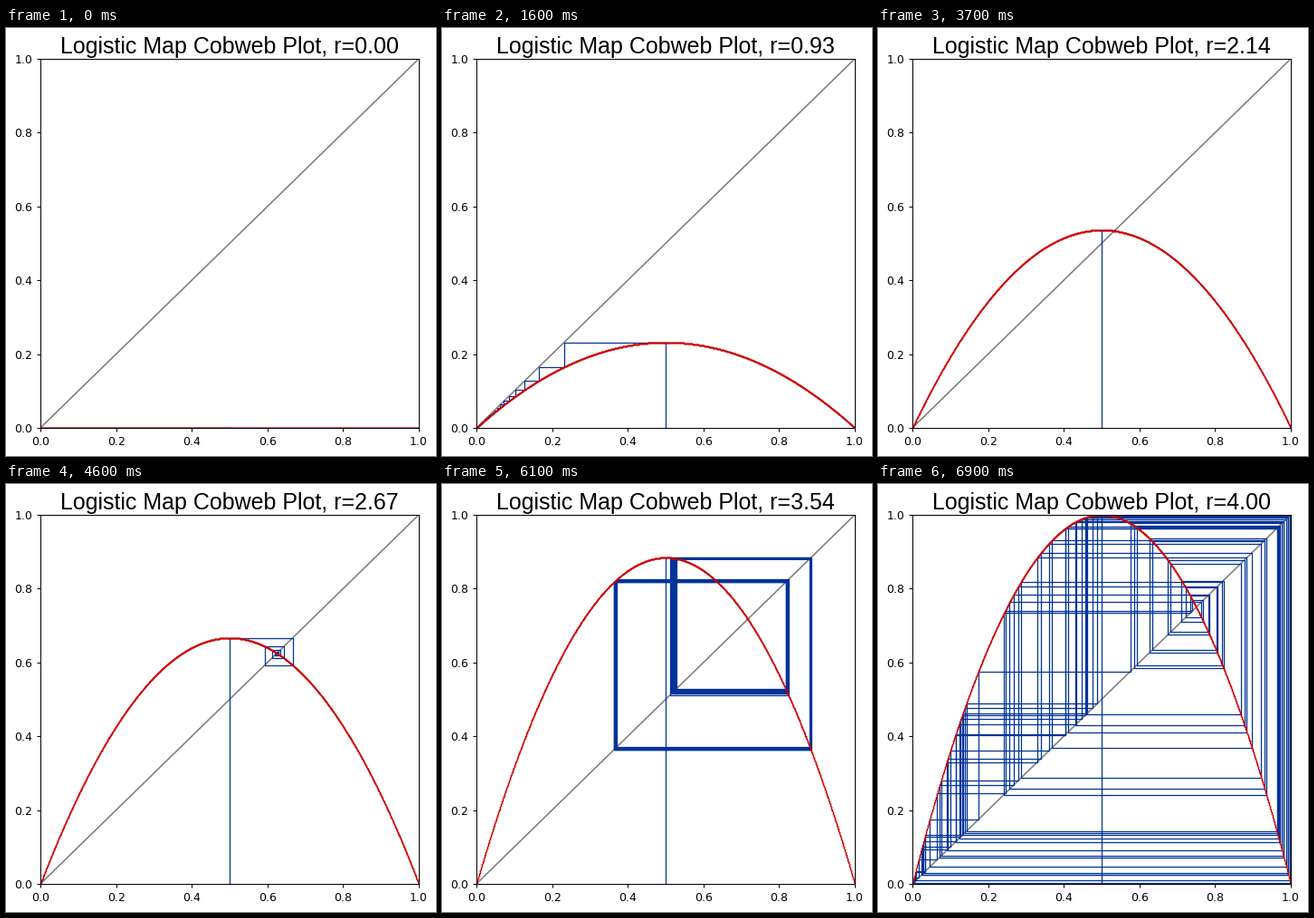
Animation, 475 px wide and 472 px high, one loop 7000 ms. Source, as a matplotlib script:

```python
import numpy as np
import matplotlib.pyplot as plt
from matplotlib.animation import FuncAnimation

WIDTH, HEIGHT, DPI = 475, 472, 90
LEFT, RIGHT, TOP, BOTTOM = 38, 456, 34, 441

FRAMES = 70
INTERVAL = 100
R_MAX = 4 - 1e-9  # at exactly 4 the orbit of 0.5 would collapse to 0
X0 = 0.5
STEPS = 100

plt.rcParams["font.family"] = "DejaVu Sans"


def logistic(r, x):
    return r * x * (1 - x)


def cobweb(r):
    """Vertices of the staircase between the curve and the diagonal."""
    xs, ys = [X0], [0.0]
    x = X0
    for _ in range(STEPS):
        y = logistic(r, x)
        xs += [x, y]
        ys += [y, y]
        x = y
    return xs, ys


fig = plt.figure(figsize=(WIDTH / DPI, HEIGHT / DPI), dpi=DPI, facecolor="white")
ax = fig.add_axes([LEFT / WIDTH, 1 - BOTTOM / HEIGHT,
                   (RIGHT - LEFT) / WIDTH, (BOTTOM - TOP) / HEIGHT])
ax.set_xlim(0, 1)
ax.set_ylim(0, 1)
title = ax.set_title("", fontsize=20, fontfamily="Liberation Sans", pad=5)

# Fine dots make the curve look thinner where it is steep.
grid = np.linspace(0, 1, 2000)
ax.plot([0, 1], [0, 1], color="gray", linewidth=1.3)
web, = ax.plot([], [], color="#003399", linewidth=1)
curve, = ax.plot([], [], "o", color="#cc0000", markersize=1.2, markeredgewidth=0)


def update(i):
    r = R_MAX * i / (FRAMES - 1)
    title.set_text(f"Logistic Map Cobweb Plot, r={r:.2f}")
    web.set_data(*cobweb(r))
    curve.set_data(grid, logistic(r, grid))
    return title, web, curve


anim = FuncAnimation(fig, update, frames=FRAMES, interval=INTERVAL,
                     repeat=True, repeat_delay=0)
plt.show()
```
